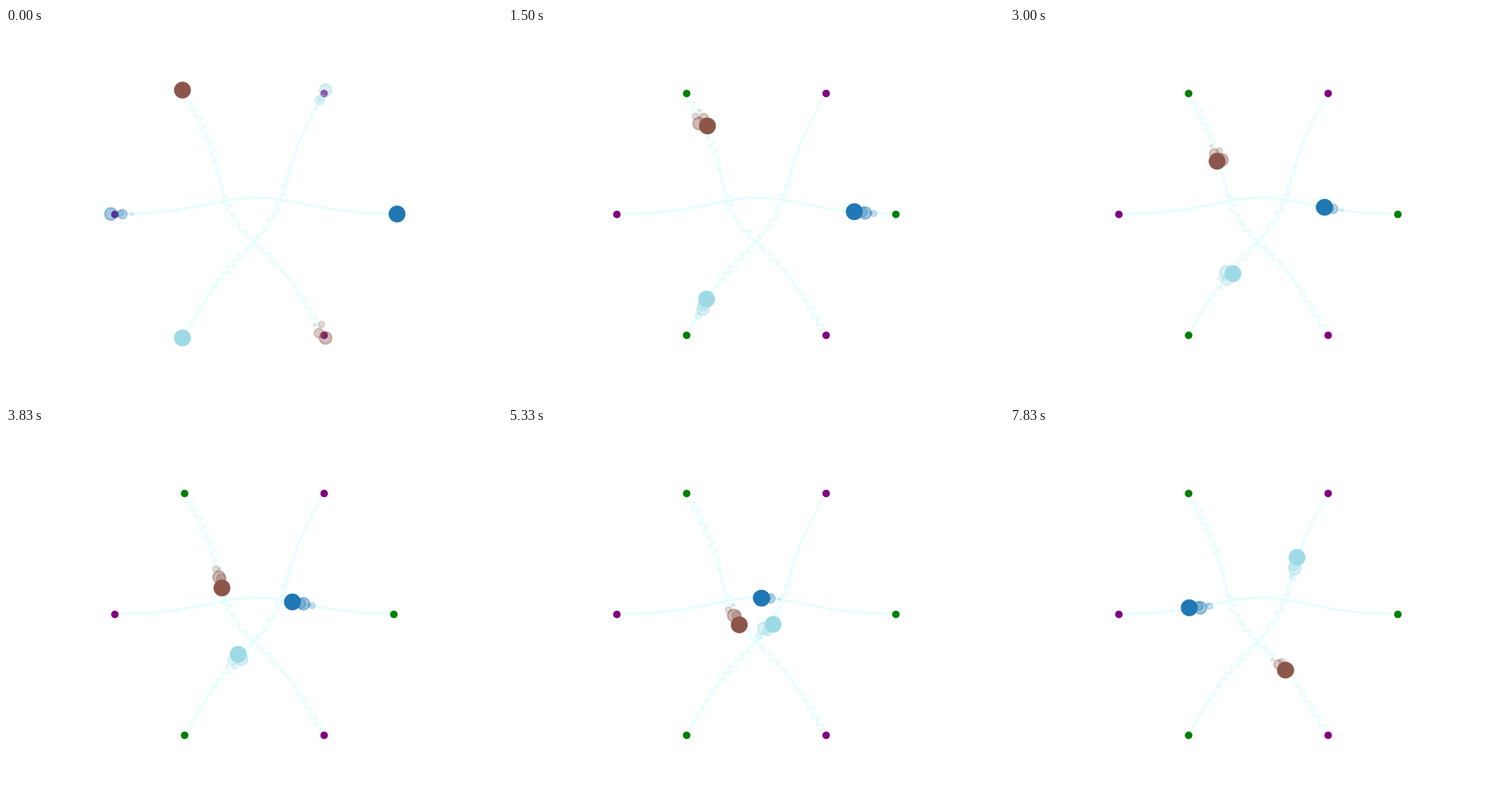
Animation, 640 px wide and 480 px high, one loop 8000 ms. Source, as a matplotlib script:

```python
import matplotlib.pyplot as plt
import numpy as np
from matplotlib.animation import FuncAnimation
from matplotlib.colors import to_rgba

W, H, DPI = 640, 480, 100
LOOP_MS, TICK_MS, LEAD_MS = 8000, 40, 35
STEP_MS = 1000 / 6
STEPS = 64              # length of the full walk; the tail wraps around it
TAIL = 4
GOAL_R, EDGE_R = 180, 184.6
SWAY = 4.3


def bump(u, centre, width):
    return np.exp(-((u - centre) / width) ** 2)


def ring(degrees, radius):
    a = np.radians(degrees)
    return np.array([W / 2 + radius * np.cos(a), H / 2 + radius * np.sin(a)])


def walk(start, height, centre, width, turn):
    """Cross the ring, bending right of the middle and swaying on every step.

    turn(u) is the sway's angle in degrees, left of the heading.
    """
    t = np.arange(STEPS)
    u = t / t[-1]
    u = u - 0.016 * np.sin(np.pi * u)
    a = np.radians(start)
    ahead = -np.array([np.cos(a), np.sin(a)])
    right = np.array([-ahead[1], ahead[0]])

    angle = np.radians(turn(u))
    sway = SWAY * np.where(t % 2, 1, -1)
    along = 2 * GOAL_R * u + sway * np.cos(angle)
    aside = height * bump(u, centre, width) - sway * np.sin(angle)
    path = ring(start, GOAL_R) + np.outer(along, ahead) + np.outer(aside, right)
    path[0], path[-1] = ring(start, EDGE_R), ring(start + 180, EDGE_R)
    return path


def steady(u):
    return -8 + 0 * u


def double_spin(u):
    return 90 - 720 / (1 + np.exp((0.54 - u) * 9))


def swing_back(u):
    return 130 * bump(u, 0.44, 0.22)


fig = plt.figure(figsize=(W / DPI, H / DPI), dpi=DPI, facecolor="white")
ax = fig.add_axes([0, 0, 1, 1])
ax.set(xlim=(0, W), ylim=(H, 0))
ax.axis("off")

starts = np.array([0, 120, 240])
ax.plot(*ring(starts, GOAL_R), "o", color="green", zorder=2)
ax.plot(*ring(starts + 180, GOAL_R), "o", color="purple", zorder=2)

# Dots from the oldest ghost to the solid head.
age = np.arange(TAIL, -1, -1)
sizes = 200 * (1 - age / (TAIL + 1)) ** 2
alphas = np.where(age == 0, 1, 0.5 - age / 10)

agents = []
for color, path in (
    ("#1f77b4", walk(0, 21, 0.49, 0.24, steady)),
    ("#8c564b", walk(240, 25, 0.47, 0.20, double_spin)),
    ("#9edae5", walk(120, 22.5, 0.52, 0.22, swing_back)),
):
    ax.plot(*path[2:-1].T, color="lightcyan", lw=1.5, zorder=1)
    shades = [to_rgba(color, a) for a in alphas]
    dots = ax.scatter(*path[-age].T, s=sizes, c=shades, lw=1.5, zorder=3)
    agents.append((path, dots))


def update(tick):
    step = int((tick * TICK_MS + LEAD_MS) / STEP_MS)
    for path, dots in agents:
        dots.set_offsets(path[(step - age) % STEPS])
    return [dots for _, dots in agents]


anim = FuncAnimation(fig, update, frames=LOOP_MS // TICK_MS, interval=TICK_MS,
                     repeat=True, repeat_delay=0, blit=False)
plt.show()
```
